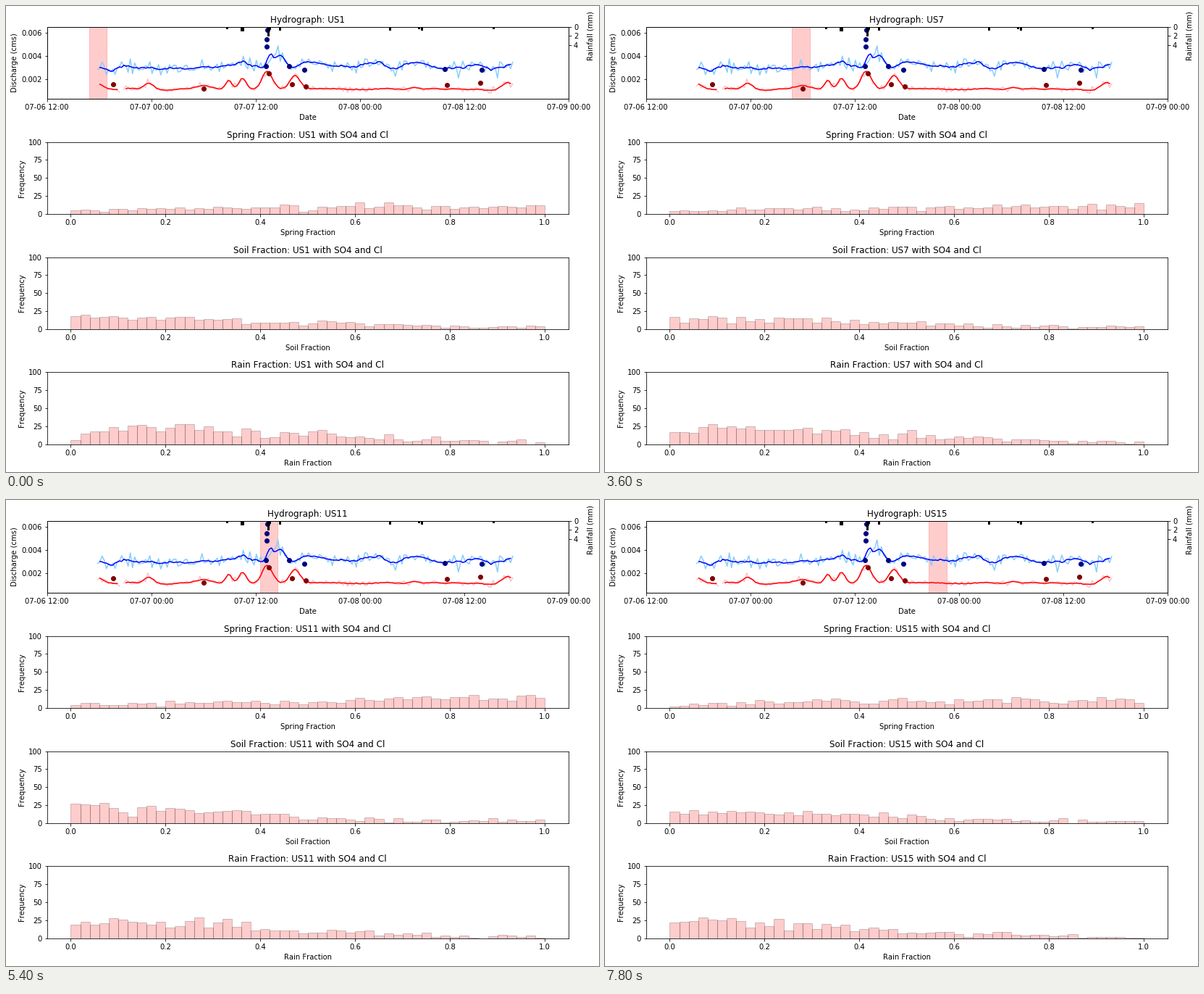
A matplotlib script for the animation above (8000 ms loop, 819 by 643 pixels).

```python
import numpy as np
import matplotlib.pyplot as plt
from matplotlib.animation import FuncAnimation

W, H, DPI = 819, 643, 72
STEP_MS, TICK_MS, LOOP_MS = 600, 200, 8000
SAMPLES = [1, 2, 3, 4, 5, 6, 7, 8, 9, 11, 12, 13, 14, 15]
BINS = 50

plt.rcParams.update({"font.family": "DejaVu Sans", "font.size": 10,
                     "axes.titlesize": 12, "text.kerning_factor": 6})

# Sampling time of key samples, in hours after the left edge
TIMES = {1: 5.85, 3: 9.8, 5: 13.63, 8: 19.88, 11: 25.5, 13: 29.8, 15: 33.55}

# Swells of the discharge: (hour, height in 0.001 cms, spread in hours)
UPPER = [(7.3, -0.25, 0.9), (15, -0.15, 1.8), (22.5, 0.5, 0.7), (25.6, 1.1, 0.5),
         (26.8, 0.85, 1), (30, 0.3, 2), (38.2, 0.25, 0.4), (42.5, 0.4, 1.3),
         (46, -0.15, 1.2), (51, -0.2, 0.8), (53.5, 0.3, 0.6)]
LOWER = [(6, 0.45, 0.7), (11.7, 0.5, 0.7), (18, 0.35, 1.4), (20.9, 0.75, 0.5),
         (22.5, 0.95, 0.6), (25.3, 1.55, 0.85), (28.5, 1.05, 0.8),
         (42.2, 0.15, 0.6), (53, 0.6, 0.8)]
UPPER_DOTS = [(25.17, 3.14), (25.25, 4.82), (25.25, 5.44), (25.33, 6.25),
              (27.83, 3.14), (29.58, 2.83), (45.75, 2.9), (50, 2.83)]
LOWER_DOTS = [(7.58, 1.59), (18, 1.22), (25.5, 2.52), (28.17, 1.59),
              (29.75, 1.41), (46, 1.53), (49.83, 1.72)]
SHOWERS = [(20.7, .3), (22.33, .8), (22.5, .8), (25.42, 1.9), (25.6, .5),
           (26.79, .7), (39.42, .7), (42.75, .3), (43.1, .7), (51.33, .3)]


def bell(x, center, spread):
    return np.exp(-((x - center) / spread) ** 2)


def spring_mean(x, sample):
    storm = bell(sample, 11, 1.2)
    return 4 + 18 * x - 12 * x ** 2 + storm * (14 * x ** 2 - 7 * x)


def soil_mean(x, sample):
    falling = 3 + 13.5 / (1 + np.exp((x - 0.45) / 0.13))
    storm, after = bell(sample, 11, 1.2), bell(sample, 13, 1)
    return falling + 8 * storm * np.exp(-5 * x) - 9 * after * np.exp(-4 * x)


def rain_mean(x, sample):
    shifted = x + 0.02 + 0.008 * sample
    return 290 * shifted * np.exp(-shifted / 0.22)


PANELS = [("Spring", spring_mean), ("Soil", soil_mean), ("Rain", rain_mean)]


def counts(mean, sample, seed):
    """Histogram counts scattered around the panel's mean curve."""
    level = mean((np.arange(BINS) + 0.5) / BINS, sample)
    scatter = np.random.default_rng([sample, seed]).normal(0, 0.8, BINS)
    return np.maximum(np.round(level + scatter * np.sqrt(level)), 0)


def pixel_axes(row):
    """Axes of the given row, laid out in stage pixels."""
    bottom = 127.9 + 158.88 * row
    return fig.add_axes([56.7 / W, 1 - bottom / H, 720.2 / W, 99.12 / H])


def draw_flow(ax, base, swells, noise, colors, dots, dot_color, seed, gap=None):
    """Noisy readings, their running mean and the sample dots."""
    hours = np.arange(5.83, 53.7, 0.25)
    trend = base + sum(h * bell(hours, c, s) for c, h, s in swells)
    wobble = np.random.default_rng(seed).normal(0, noise, len(hours)) * trend
    raw = trend + wobble
    mean = trend + np.convolve(wobble, np.ones(7) / 7, "same")
    if gap:
        start, end = gap
        raw[(hours > start + 0.25) & (hours < end - 0.25)] = np.nan
        mean[(hours > start) & (hours < end)] = np.nan
    ax.plot(hours, raw, color=colors[0], lw=1.5)
    ax.plot(hours[1:-1], mean[1:-1], color=colors[1], lw=1.5)
    ax.plot(*zip(*dots), "o", color=dot_color, ms=6, zorder=3)


fig = plt.figure(figsize=(W / DPI, H / DPI), dpi=DPI, facecolor="white")

flow = pixel_axes(0)
flow.set(xlim=(0, 60), ylim=(0.35, 6.5), xlabel="Date", ylabel="Discharge (cms)")
flow.set_xticks(range(0, 61, 12),
                ["07-06 12:00", "07-07 00:00", "07-07 12:00",
                 "07-08 00:00", "07-08 12:00", "07-09 00:00"])
flow.set_yticks([2, 4, 6], ["0.002", "0.004", "0.006"])
flow.autoscale(False)
draw_flow(flow, 3.07, UPPER, 0.1, ("lightskyblue", "blue"), UPPER_DOTS, "navy", 4)
draw_flow(flow, 1.16, LOWER, 0.1, ("pink", "red"), LOWER_DOTS, "maroon", 9,
          gap=(8.1, 9.0))
band = flow.axvspan(0, 2.04, color="red", alpha=0.2)
flow_title = flow.set_title("")

rain = flow.twinx()
rain.bar(*zip(*SHOWERS), width=0.2, color="black", edgecolor="black", lw=1)
rain.set(xlim=(0, 60), ylim=(16, 0), yticks=[0, 2, 4])
fig.text(807 / W, 1 - 41.5 / H, "Rainfall (mm)", rotation=90,
         ha="center", va="center")

titles, bar_sets = [], []
for row, (name, _) in enumerate(PANELS, 1):
    ax = pixel_axes(row)
    bars = ax.bar(np.arange(BINS) / BINS, np.zeros(BINS), 1 / BINS, align="edge",
                  color="red", edgecolor="black", lw=1, alpha=0.2)
    ax.set(xlim=(-0.05, 1.05), ylim=(0, 100), yticks=range(0, 101, 25),
           xlabel=f"{name} Fraction", ylabel="Frequency")
    ax.set_xticks(np.arange(6) / 5)
    titles.append(ax.set_title(""))
    bar_sets.append(bars)


def update(tick):
    sample = SAMPLES[tick * TICK_MS // STEP_MS]
    flow_title.set_text(f"Hydrograph: US{sample}")
    center = np.interp(sample, list(TIMES), list(TIMES.values()))
    band.set_x(center - 1.02)
    for i, (name, mean) in enumerate(PANELS):
        titles[i].set_text(f"{name} Fraction: US{sample} with SO4 and Cl")
        for bar, value in zip(bar_sets[i], counts(mean, sample, i)):
            bar.set_height(value)


anim = FuncAnimation(fig, update, frames=LOOP_MS // TICK_MS, interval=TICK_MS,
                     init_func=lambda: update(0), repeat=True, repeat_delay=0)
plt.show()
```
